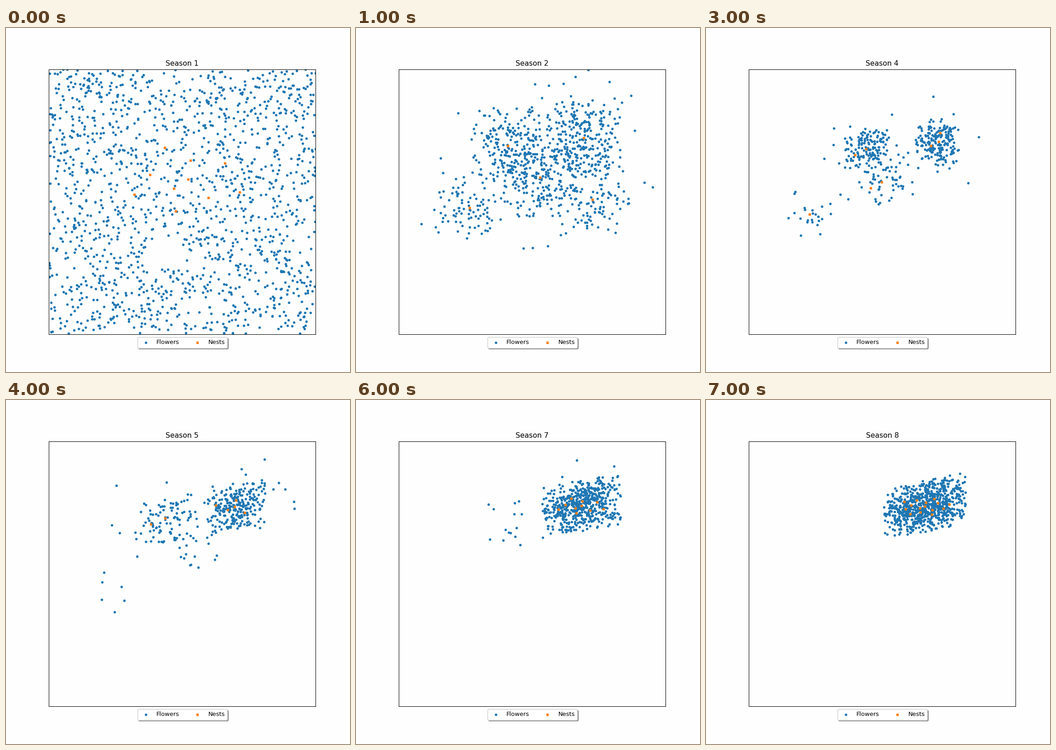
Animation, 748 px wide and 748 px high, one loop 8 s. Source, as a matplotlib script:

```python
import matplotlib.pyplot as plt
import numpy as np
from matplotlib.animation import FuncAnimation

SIZE, DPI = 748, 93.5
LEFT, RIGHT, TOP, BOTTOM = 93.4, 673.2, 89.8, 665.7  # y points down
BLUE, ORANGE, PAPER = "#1f77b4", "#ff7f0e", "#fefefe"
GOLDEN_ANGLE = np.pi * (3 - np.sqrt(5))

# Per season: spread in x and y, then colonies as (x, y, flowers, nests).
SEASONS = [
    (115, 135, [(396, 329, 0, 10)]),
    (46, 48, [(495, 239, 260, 1), (330, 256, 195, 1), (400, 325, 205, 1),
              (247, 391, 85, 1), (514, 373, 100, 1)]),
    (31, 29, [(514, 243, 85, 1), (485, 252, 75, 1), (333, 269, 115, 1),
              (392, 321, 85, 1), (462, 345, 65, 0), (238, 402, 68, 1)]),
    (29, 29, [(348, 263, 150, 2), (382, 335, 35, 2), (432, 312, 20, 0),
              (506, 247, 190, 3), (225, 405, 26, 1)]),
    (38, 30, [(346, 257, 95, 2), (497, 232, 265, 5), (395, 318, 18, 0),
              (245, 408, 6, 0)]),
    (43, 31, [(345, 258, 52, 1), (500, 233, 370, 7)]),
    (49, 32, [(345, 262, 14, 0), (490, 230, 540, 10)]),
    (51, 32, [(476, 231, 760, 15)]),
]


def meadow(rng, count, hole=(348, 494), radius=(46, 27)):
    """Flowers all over the field, apart from one bare patch."""
    pts = rng.uniform((LEFT, TOP), (RIGHT, BOTTOM), (count, 2))
    return pts[np.hypot(*((pts - hole) / radius).T) > 1]


def cloud(rng, count, tail, cut=1.75):
    """Unit normal scatter with a sharp edge and a few wide strays."""
    pts = rng.normal(size=(count * 2 + 20, 2))
    pts = pts[np.abs(pts).max(axis=1) < cut][:count]
    pts[rng.random(len(pts)) < tail] *= 2
    return pts


def nest_ring(count):
    """Evenly spread offsets; a lone nest sits in the middle."""
    i = np.arange(count)
    r = np.sqrt(i / max(count - 1, 1))
    angle = i * GOLDEN_ANGLE
    return np.column_stack((1.1 * r * np.cos(angle), 0.65 * r * np.sin(angle)))


def grow(season):
    rng = np.random.default_rng(40 + season)
    sx, sy, colonies = SEASONS[season]
    tail = 0.12 * (1 - season / 7)
    slant = -0.03 * season if season > 3 else 0
    shape = np.array([[sx, slant * sx], [0, sy]])
    flowers, nests = [], []
    for x, y, n_flowers, n_nests in colonies:
        flowers.append((x, y) + cloud(rng, n_flowers, tail) @ shape)
        nests.append((x, y) + nest_ring(n_nests) * (sx, sy))
    if season == 0:
        flowers.append(meadow(rng, 1550))
    return np.vstack(flowers), np.vstack(nests)


FIELD = [grow(season) for season in range(len(SEASONS))]

fig, ax = plt.subplots(figsize=(SIZE / DPI, SIZE / DPI), dpi=DPI,
                       facecolor=PAPER)
fig.subplots_adjust(left=LEFT / SIZE, right=RIGHT / SIZE,
                    bottom=1 - BOTTOM / SIZE, top=1 - TOP / SIZE)
ax.set(xlim=(LEFT, RIGHT), ylim=(BOTTOM, TOP), xticks=[], yticks=[],
       facecolor=PAPER)
flowers = ax.scatter([], [], s=10, marker="o", color=BLUE, label="Flowers")
nests = ax.scatter([], [], s=10, marker="s", color=ORANGE, label="Nests")
ax.legend(loc="upper center", bbox_to_anchor=(0.5, 0), ncol=2,
          fancybox=True, shadow=True, scatterpoints=1)
title = ax.set_title("Season 1")


def update(season):
    for artist, pts in zip((flowers, nests), FIELD[season]):
        artist.set_offsets(pts)
    title.set_text(f"Season {season + 1}")
    return flowers, nests, title


anim = FuncAnimation(fig, update, frames=len(SEASONS), interval=1000,
                     repeat=True, repeat_delay=0)
plt.show()
```
